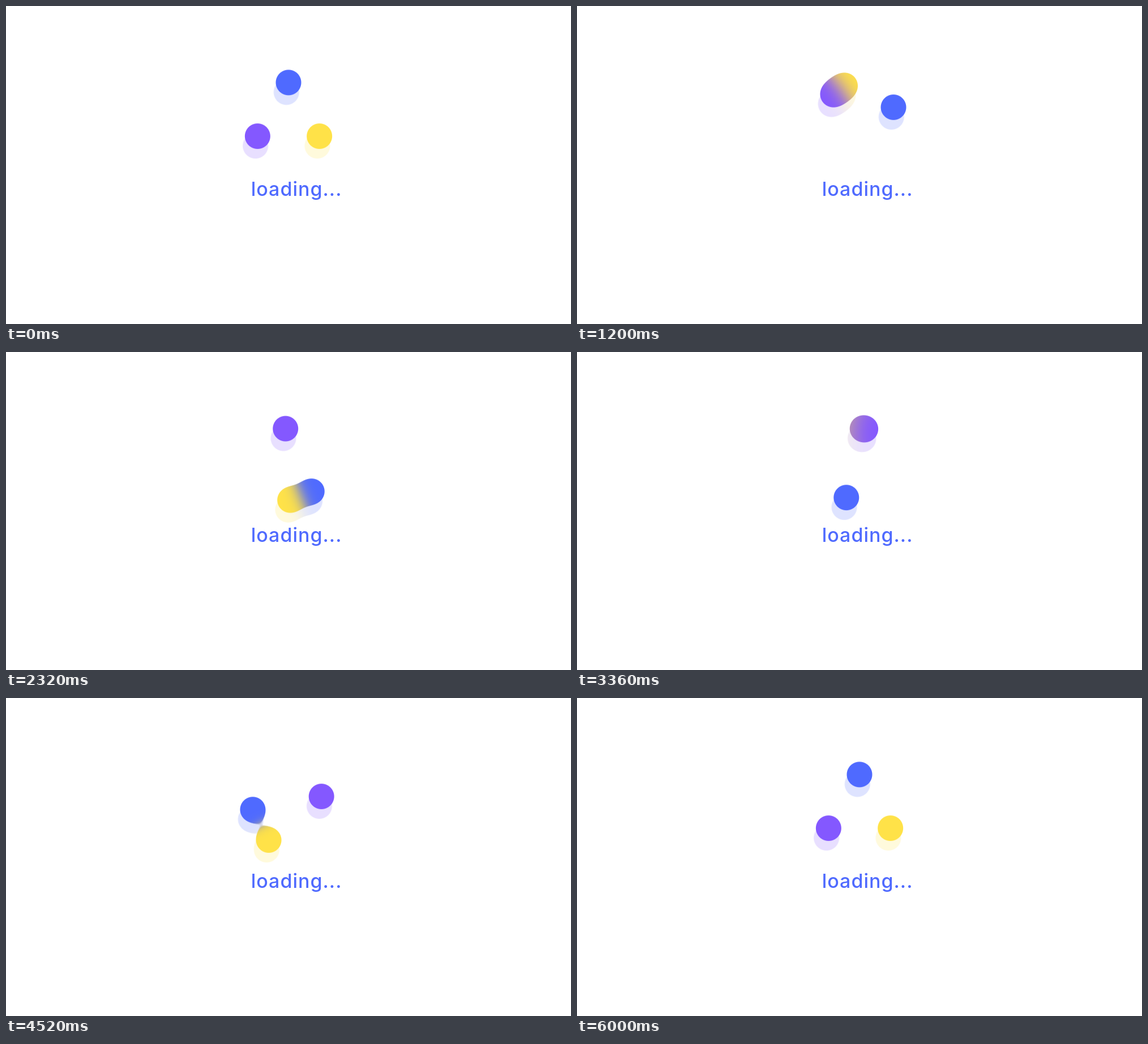
An HTML page with a canvas that plays this animation: 998 px wide and 561 px high, repeating every 6040 ms.

```html
<!DOCTYPE html>
<html lang="en">
<head>
<meta charset="utf-8">
<title>Loading</title>
<style>
  html, body { margin: 0; width: 100%; height: 100%; overflow: hidden; background: #fff; }
  canvas, svg { position: absolute; left: 0; top: 0; }
  text { font: 500 34px Inter, Roboto, sans-serif; letter-spacing: 1px; fill: #4f6aff; }
</style>
</head>
<body>
<canvas id="stage" width="998" height="561"></canvas>
<svg width="998" height="561"><text x="432.7" y="334.6">loading...</text></svg>
<script>
const LOOP = 6040, STEP = 40;
const CENTER = { x: 499, y: 198.1 }, ORBIT = 63.1;
const SHADOW = { x: -3.7, y: 17, alpha: 0.19 };

// Top-most dot first; speed in degrees per second
const DOTS = [
  { color: [132, 88, 255], start: 240, speed: 360 },
  { color: [255, 226, 72], start: 120, speed: 180 },
  { color: [79, 106, 255], start: 0, speed: 60 }
];

// Gooey look: blur the discs, then cut the blurred field at a level
const DISC = 19, SIGMA = 14, LEVEL = 0.2676, SHARPNESS = 50;
const HALF = 98, SIZE = HALF * 2, CELL = 2, N = SIZE / CELL + 1;

const stage = document.getElementById('stage').getContext('2d');
const layer = document.createElement('canvas');
layer.width = layer.height = SIZE;
const layerCtx = layer.getContext('2d');
const pixels = layerCtx.createImageData(SIZE, SIZE);

const clamp = v => Math.max(0, Math.min(1, v));
const REACH = Math.ceil(3 * SIGMA / CELL);
const kernel = Float32Array.from({ length: 2 * REACH + 1 },
  (_, i) => Math.exp(-(((i - REACH) * CELL / SIGMA) ** 2) / 2));
const total = kernel.reduce((a, b) => a + b);
kernel.forEach((k, i) => { kernel[i] = k / total; });

const grid = () => new Float32Array(N * N);
const covered = grid(), scratch = grid(), fields = DOTS.map(grid);

// Blurs rows and writes them as columns, so two calls blur both ways
function blurRows(src, dst) {
  for (let y = 0; y < N; y++) {
    for (let x = 0; x < N; x++) {
      const from = Math.max(0, x - REACH), to = Math.min(N - 1, x + REACH);
      let sum = 0;
      for (let i = from; i <= to; i++) sum += src[y * N + i] * kernel[i - x + REACH];
      dst[x * N + y] = sum;
    }
  }
}

function fillField(dot, field, t) {
  const a = (dot.start + dot.speed * t) * Math.PI / 180;
  const cx = HALF + ORBIT * Math.sin(a), cy = HALF - ORBIT * Math.cos(a);
  for (let y = 0, k = 0; y < N; y++) {
    for (let x = 0; x < N; x++, k++) {
      const d = Math.hypot(x * CELL - cx, y * CELL - cy);
      const cover = clamp((DISC - d) / CELL + 0.5);
      field[k] = Math.max(0, cover - covered[k]);
      covered[k] = Math.max(covered[k], cover);
    }
  }
  blurRows(field, scratch);
  blurRows(scratch, field);
}

function sample(f, k, u, v) {
  const top = f[k] + (f[k + 1] - f[k]) * u;
  const low = f[k + N] + (f[k + N + 1] - f[k + N]) * u;
  return top + (low - top) * v;
}

function paintBlobs(t) {
  covered.fill(0);
  DOTS.forEach((dot, i) => fillField(dot, fields[i], t));
  const data = pixels.data;
  for (let y = 0, p = 0; y < SIZE; y++) {
    const gy = (y + 0.5) / CELL, row = Math.floor(gy);
    for (let x = 0; x < SIZE; x++, p += 4) {
      const gx = (x + 0.5) / CELL, col = Math.floor(gx);
      let sum = 0, r = 0, g = 0, b = 0;
      for (let i = 0; i < DOTS.length; i++) {
        const w = sample(fields[i], row * N + col, gx - col, gy - row);
        const c = DOTS[i].color;
        sum += w;
        r += w * c[0];
        g += w * c[1];
        b += w * c[2];
      }
      const alpha = clamp((sum - LEVEL) * SHARPNESS + 0.5);
      data[p + 3] = alpha * 255;
      if (alpha > 0) {
        data[p] = r / sum;
        data[p + 1] = g / sum;
        data[p + 2] = b / sum;
      }
    }
  }
  layerCtx.putImageData(pixels, 0, 0);
}

function draw(t) {
  paintBlobs(t);
  const x = CENTER.x - HALF, y = CENTER.y - HALF;
  stage.clearRect(0, 0, 998, 561);
  stage.globalAlpha = SHADOW.alpha;
  stage.drawImage(layer, x + SHADOW.x, y + SHADOW.y);
  stage.globalAlpha = 1;
  stage.drawImage(layer, x, y);
}

let shown = -1;
function tick() {
  const step = Math.floor(performance.now() % LOOP / STEP);
  if (step !== shown) {
    shown = step;
    draw(step * STEP / 1000);
  }
  requestAnimationFrame(tick);
}
tick();
</script>
</body>
</html>
```
